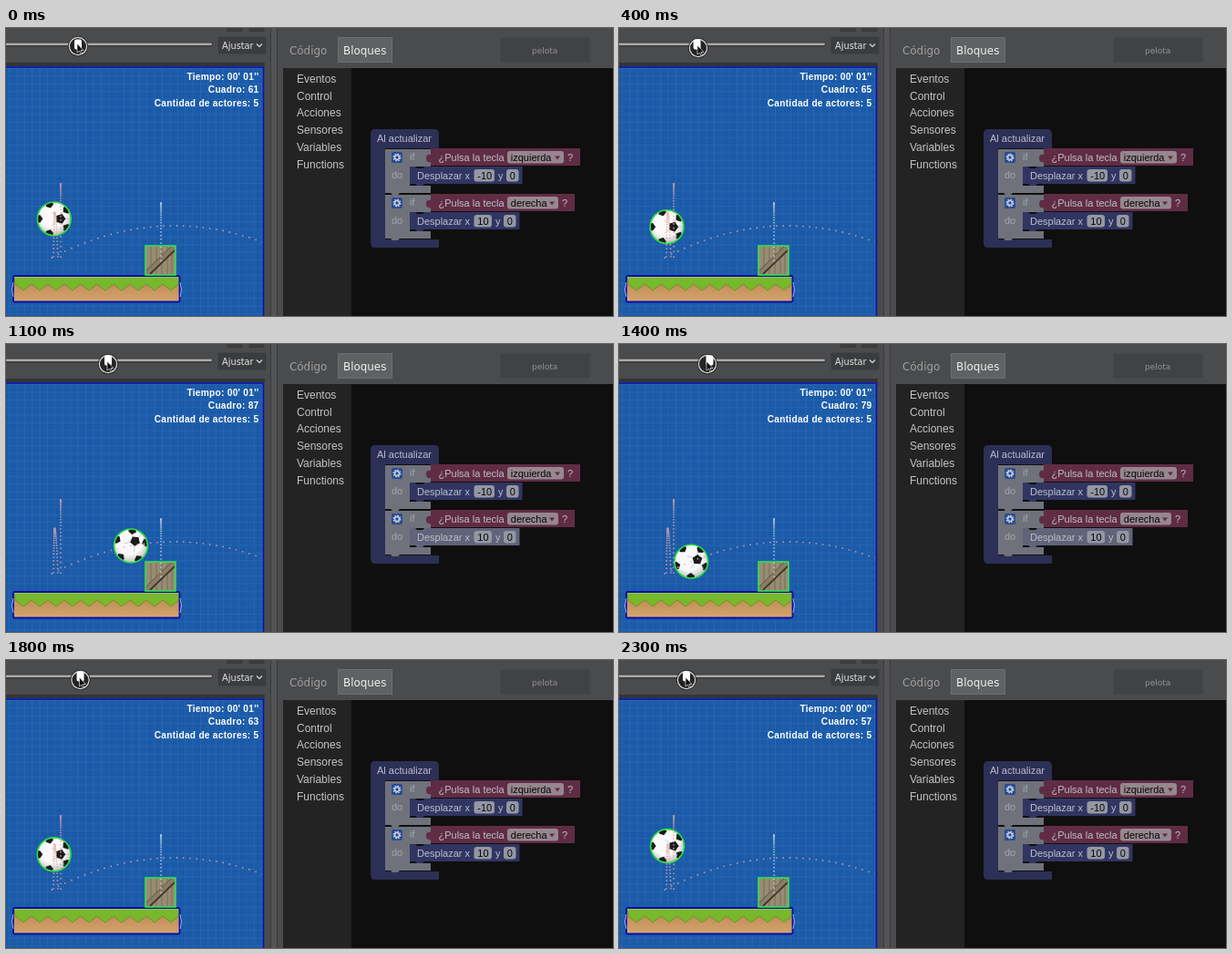
Write an HTML page that moves like this. It is 666 px wide and 316 px high and loops after 2400 ms.

```html
<!DOCTYPE html>
<html lang="es">
<head>
<meta charset="utf-8">
<title>Pelota</title>
<style>
html, body { margin: 0; width: 100%; height: 100%; overflow: hidden; background: #444; }
svg { display: block; width: 666px; height: 316px; }
text { white-space: pre; }
.ui { font-family: "DejaVu Sans", Verdana, sans-serif; }
.arial { font-family: "Liberation Sans", Arial, sans-serif; }
.stat { font: bold 10.2px "Liberation Sans", Arial, sans-serif; letter-spacing: .25px; fill: #fff; text-anchor: end; }
</style>
</head>
<body>
<svg id="stage" viewBox="0 0 666 316" xmlns="http://www.w3.org/2000/svg">
  <defs>
    <pattern id="grid" width="8.4" height="8.4" patternUnits="userSpaceOnUse" x="3" y="44">
      <rect width="8.4" height="8.4" fill="#1b5aa8"/>
      <path d="M0 .5H8.4M.5 0V8.4" stroke="#2766b1" stroke-width=".8"/>
    </pattern>
    <radialGradient id="shade" cx=".45" cy=".38" r=".65">
      <stop offset=".6" stop-color="#fafafa"/><stop offset="1" stop-color="#b9bcbc"/>
    </radialGradient>
    <linearGradient id="dirt" x2="0" y2="1">
      <stop offset="0" stop-color="#b9844f"/><stop offset="1" stop-color="#d3a56c"/>
    </linearGradient>
    <clipPath id="disc"><circle r="18"/></clipPath>
    <clipPath id="world"><rect y="44" width="281" height="272"/></clipPath>
  </defs>

  <!-- window frame and toolbar -->
  <rect width="666" height="316" fill="#4a4b4d"/>
  <path d="M243 0V3.5H259V0M267 0V3.5H283V0" fill="#3d3d3e" stroke="#383839"/>
  <rect x="-4" y="15.500" width="231" height="5" rx="2.500" fill="#3b3b3c"/>
  <rect x="-4" y="16.500" width="230" height="2.600" rx="1.300" fill="#a8a8a8"/>
  <rect x="232.500" y="9.500" width="53" height="19" rx="2" fill="#3b3c3e" stroke="#434446"/>
  <text class="ui" x="237" y="23" font-size="9.800" fill="#e4e4e4">Ajustar</text>
  <path d="M275 17.500l3 3 3-3" fill="none" stroke="#ddd" stroke-width="1.200"/>
  <rect y="38" width="284" height="4" fill="#333436"/>
  <rect x="290" width="8" height="316" fill="#525355"/>
  <path d="M290.500 0V316M297.500 0V316" stroke="#3a3a3b"/>

  <!-- game world -->
  <rect y="42" width="283" height="274" fill="url(#grid)"/>
  <path d="M0 43H282.500V316" fill="none" stroke="#1010a8" stroke-width="1.600"/>
  <text class="stat" id="clock" x="277.500" y="56.500"></text>
  <text class="stat" id="count" x="277.500" y="71.300"></text>
  <text class="stat" x="277.500" y="86">Cantidad de actores: 5</text>
  <rect x="8" y="272" width="183" height="28" fill="url(#dirt)"/>
  <path id="grass" fill="#78b82c" stroke="#6a8a2c" stroke-width=".8"/>
  <path d="M8 273.500H191" stroke="#96cc48"/>
  <rect x="8" y="272" width="182.500" height="28.500" rx="1.500" fill="none" stroke="#0c0ca8" stroke-width="1.800"/>
  <path d="M8 279q-3 8 0 16M191 279q3 8 0 16" fill="none" stroke="#b4b8ec" stroke-width=".9"/>
  <g id="crate">
    <rect x="153" y="239" width="33" height="32" fill="#998c75"/>
    <path d="M159 240V270M165 240V270M171 240V270M177 240V270M182 240V270" stroke="#766a58" stroke-width=".9"/>
    <path d="M154 266L181 240H185V244L158 270H154Z" fill="#8c7d66"/>
    <path d="M158 270L185 244" stroke="#3f372c" stroke-width="1.800"/>
    <path d="M154 266L181 240" stroke="#5d5242"/>
    <rect x="153" y="239" width="33" height="32" fill="none" stroke="#32e24a" stroke-width="1.600"/>
  </g>
  <g id="ball">
    <circle r="18" fill="url(#shade)"/>
    <g id="skin" clip-path="url(#disc)"></g>
    <circle r="18.400" fill="none" stroke="#2bdd42" stroke-width="1.600"/>
  </g>
  <g id="trail" clip-path="url(#world)" opacity=".8"></g>

  <!-- editor -->
  <text class="ui" x="311" y="29" font-size="11.900" fill="#a0a0a0">Código</text>
  <rect x="364.500" y="10.500" width="59" height="27" fill="#5f6162" stroke="#6c6e6f"/>
  <text class="ui" x="370" y="29" font-size="11.900" fill="#f0f0f0">Bloques</text>
  <rect x="542.500" y="10.500" width="98" height="27" fill="#414244" stroke="#454648"/>
  <text class="ui" x="577" y="27.500" font-size="9" fill="#939393">pelota</text>
  <rect x="304" y="44" width="362" height="272" fill="#0f0f0f"/>
  <rect x="304" y="44" width="75" height="272" fill="#232324"/>
  <g id="menu" class="arial" font-size="12" fill="#c4c4c4"></g>
  <g id="blocks" class="arial" font-size="11">
    <path d="M400 116q0-5 5-5H470q5 0 5 5V132H416V232H475V241H405q-5 0-5-5Z" fill="#2c2f56"/>
    <text x="407" y="125" fill="#bbbcca">Al actualizar</text>
  </g>

  <!-- scrubber -->
  <g id="pointer"><circle r="11" fill="#242424"/><circle r="9.600" fill="none" stroke="#dcdcdc" stroke-width="1.200"/></g>
  <rect id="knob" x="-4" y="12.500" width="8" height="11" rx="2" fill="#fff"/>
  <path id="arrow" d="M-1-3V7L1.500 5 3 8.500 4.500 7.800 3 4.500H6Z" fill="#111" stroke="#fff" stroke-width=".6"/>
</svg>
<script>
const NS = "http://www.w3.org/2000/svg";
const $ = id => document.getElementById(id);

function add(parent, tag, attrs, label) {
  const el = document.createElementNS(NS, tag);
  for (const k in attrs) el.setAttribute(k, attrs[k]);
  if (label) el.textContent = label;
  return parent.appendChild(el);
}
const move = (id, x, y) => $(id).setAttribute("transform", `translate(${x} ${y})`);

// Ball position as a function of the game's frame counter.
const GRAVITY = 0.11, FLOOR = 254, APEX = 53, KICK = 75;
function ballAt(n) {
  if (n < 31.5) return [60, 171 + GRAVITY * (n - 4) ** 2];
  if (n < KICK) {
    const drift = n < APEX ? 0.17 : 0.06;
    return [53.3 - drift * (n - APEX), Math.min(FLOOR, 202.3 + GRAVITY * (n - APEX) ** 2)];
  }
  const x = 72 + 7.22 * (n - 78);
  return [x, 217 + 0.00193 * (185 - x) ** 2];
}

function drawTrails() {
  for (let n = 4; n < 108; n++) {
    const [cx, cy] = ballAt(n);
    add($("trail"), "circle", { cx, cy, r: 0.9, fill: "#e6a8a8" });
  }
  for (let n = 0; n < 25; n++)
    add($("trail"), "circle", { cx: 170, cy: 192 + GRAVITY * n * n, r: 0.85, fill: "#d5e3f2" });
}

function drawBall() {
  const CENTER = 7;
  const pentagon = (x, y, r, turn) => {
    const pts = [0, 1, 2, 3, 4].map(i => {
      const a = turn + i * Math.PI * 0.4;
      return `${x + r * Math.cos(a)},${y + r * Math.sin(a)}`;
    });
    add($("skin"), "polygon", { points: pts.join(" "), fill: "#1b1b1b" });
  };
  for (let i = 0; i < 5; i++) {
    const a = i * Math.PI * 0.4;
    const at = r => `${CENTER + r * Math.cos(a)} ${r * Math.sin(a)}`;
    add($("skin"), "path", { d: `M${at(5)}L${at(12)}`, stroke: "#c4c6c6", "stroke-width": 0.8 });
    const b = a + Math.PI / 5;
    pentagon(17 * Math.cos(b), 17 * Math.sin(b), 4.6, b + Math.PI);
  }
  pentagon(CENTER, 0, 5.6, 0);
}

function drawGrass() {
  let d = "M9 273H190V281";
  for (let x = 190; x > 10; x -= 18) d += `L${Math.max(9, x - 9)} 288L${Math.max(9, x - 18)} 281`;
  $("grass").setAttribute("d", d + "Z");
}

function drawMenu() {
  ["Eventos", "Control", "Acciones", "Sensores", "Variables", "Functions"]
    .forEach((s, i) => add($("menu"), "text", { x: 319, y: 60 + i * 18.7 }, s));
}

function field(parent, x, y, w, label, fill) {
  add(parent, "rect", { x, y, width: w, height: 13.5, rx: 3, fill });
  add(parent, "text", { x: x + 3.8, y: y + 10.7, fill: "#060606" }, label);
}

function drawRule(y, key, right, dx, boxW) {
  const g = add($("blocks"), "g", {});
  const pale = "#bdbec8", dim = "#a3a6ae", value = "#9496a2";
  add(g, "path", {
    d: `M416 ${y}H466V${y + 19}H443V${y + 40}H466V${y + 48}H432l-2 2h-6l-2-2H416Z`,
    fill: "#6f727b"
  });
  add(g, "rect", { x: 423, y: y + 3, width: 12, height: 12, rx: 2, fill: "#274a92" });
  add(g, "circle", { cx: 429, cy: y + 9, r: 3.6, fill: "none", stroke: "#c3cce0", "stroke-width": 1.8, "stroke-dasharray": "1.6 1.2" });
  add(g, "circle", { cx: 429, cy: y + 9, r: 2.4, fill: "none", stroke: "#c3cce0", "stroke-width": 1.5 });
  add(g, "text", { x: 443, y: y + 12, fill: dim }, "if");
  add(g, "text", { x: 423, y: y + 32, fill: dim }, "do");

  add(g, "path", {
    d: `M466 ${y - 1}H${right}V${y + 18}H466V${y + 14}q-5 1-5-4t5-4Z`,
    fill: "#602c44"
  });
  add(g, "text", { x: 474.5, y: y + 12.5, fill: pale }, "¿Pulsa la tecla");
  const w = right - 568;
  field(g, 550, y + 2, w, key, "#96878e");
  add(g, "path", { d: `M${550 + w - 10} ${y + 7.5}h6l-3 4Z`, fill: "#602c44" });
  add(g, "text", { x: right - 14, y: y + 12.5, fill: pale }, "?");

  const end = 530 + boxW + 14;
  const body = add(g, "path", {
    d: `M443 ${y + 19}h6l2 2h6l2-2H${end}V${y + 38}H459l-2 2h-6l-2-2H443Z`,
    fill: "#313562"
  });
  add(g, "text", { x: 451, y: y + 32.5, fill: pale }, "Desplazar x");
  field(g, 513.5, y + 22, boxW, dx, value);
  add(g, "text", { x: 517.5 + boxW, y: y + 32.5, fill: pale }, "y");
  field(g, end - 17.5, y + 22, 13.5, "0", value);
  return body;
}

drawTrails();
drawBall();
drawGrass();
drawMenu();
drawRule(133, "izquierda", 630, "-10", 22.5);
const pushBlock = drawRule(183, "derecha", 624, "10", 19.5);

// Scrubbing: game frame shown at each 100 ms step, and pointer keys [step, x].
const STEP = 100;
const counts = [61, 62, 63, 64, 65, 69, 74, 78, 81, 84, 86, 87,
                86, 83, 79, 74, 69, 66, 63, 61, 59, 58, 57, 57];
const keys = [[0, 79], [4, 87], [7, 106], [11, 112], [16, 87], [20, 76], [23, 74]];

function pointerAt(s) {
  const i = Math.max(1, keys.findIndex(k => k[0] >= s));
  const [[s0, x0], [s1, x1]] = [keys[i - 1], keys[i]];
  return x0 + (x1 - x0) * (s - s0) / (s1 - s0);
}

function show(s) {
  const n = counts[s];
  const [x, y] = ballAt(n);
  const spin = -4 * Math.max(0, n - KICK);
  move("ball", x, y);
  $("skin").setAttribute("transform", `rotate(${spin})`);
  $("clock").textContent = `Tiempo: 00' 0${Math.floor(n / 60)}''`;
  $("count").textContent = `Cuadro: ${n}`;
  pushBlock.setAttribute("fill", n >= KICK ? "#60637a" : "#313562");

  const px = pointerAt(s), py = s === 0 ? 20 : 22;
  move("pointer", px, py);
  move("arrow", px, py);
  move("knob", (px + 74 + 1.27 * (n - 57)) / 2, 0);
}

const start = performance.now();
let last = -1;
function tick() {
  const s = Math.floor((performance.now() - start) / STEP) % counts.length;
  if (s !== last) show(last = s);
  requestAnimationFrame(tick);
}
tick();
</script>
</body>
</html>
```
